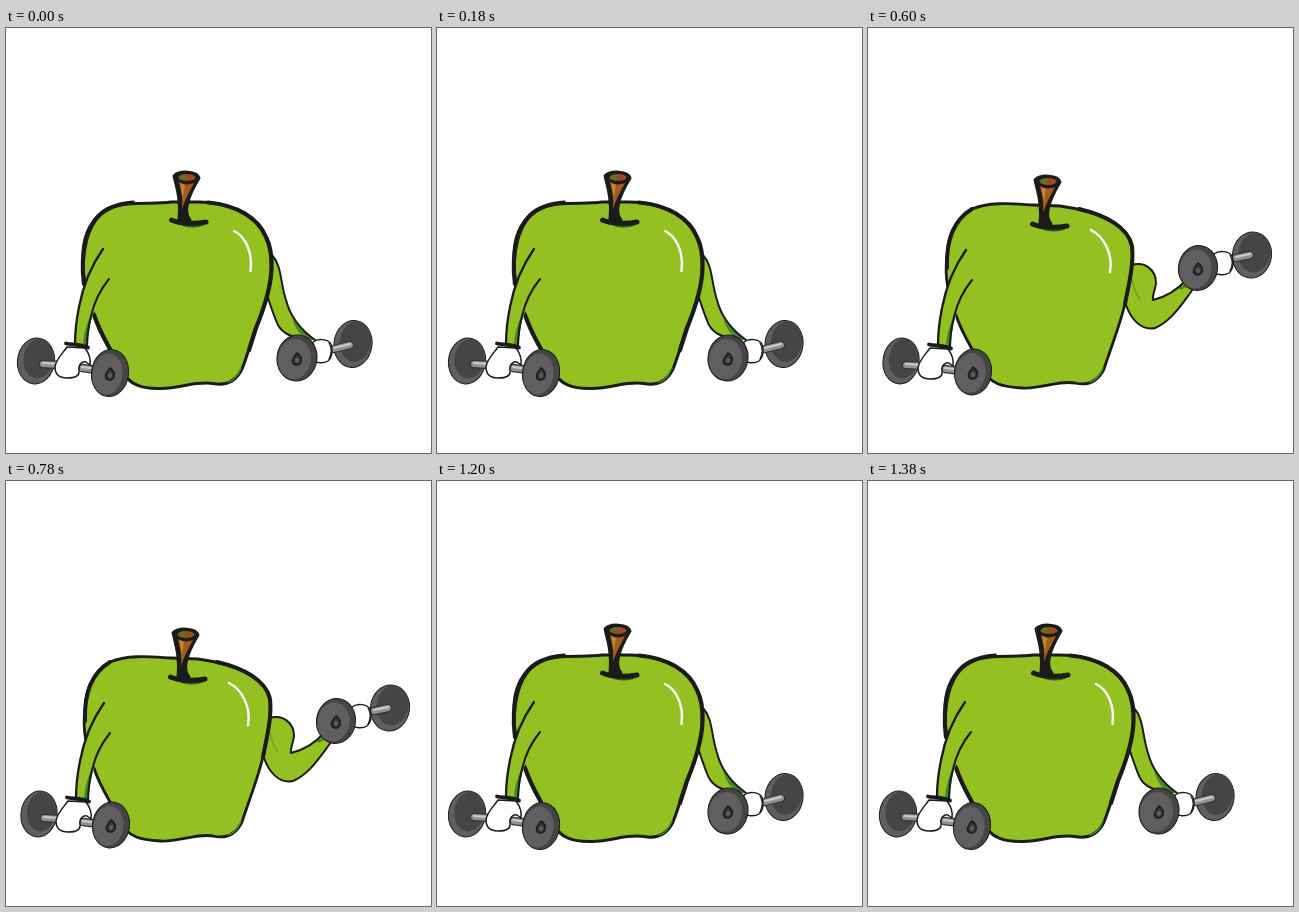
Write an HTML page that moves like this. It is 425 by 425 pixels and loops after 1500 ms.

```html
<!DOCTYPE html>
<html lang="en">
<head>
<meta charset="utf-8">
<title>Apple lifting dumbbells</title>
<style>
  html, body { margin: 0; width: 100%; height: 100%; overflow: hidden; background: #fff; }
  svg { display: block; width: 100vw; height: 100vh; }
</style>
</head>
<body>
<svg id="stage" viewBox="0 0 425 425" fill="none" stroke-linecap="round" stroke-linejoin="round"></svg>
<script>
const INK = '#1c1b1b', GREEN = '#94c122', SHADE = '#3f8a2c';
const DARK = '#464546', LIGHT = '#605e60';
const HOLD = 300;
const ORDER = [0, 1, 2, 1, 0];

const path = (d, stroke, width, fill = 'none') =>
  `<path d="${d}" stroke="${stroke}" stroke-width="${width}" fill="${fill}"/>`;
const line = (d, width = 2, color = INK) => path(d, color, width);
const shape = (d, fill) => path(d, 'none', 0, fill);
const oval = (x, y, rx, ry, fill, tilt = 0, extra = '') =>
  `<ellipse cx="${x}" cy="${y}" rx="${rx}" ry="${ry}" fill="${fill}" transform="rotate(${tilt} ${x} ${y})" ${extra}/>`;
const shift = (x, y, body) => `<g transform="translate(${x} ${y})">${body}</g>`;

const plate = ([x, y, rx, ry], rim, face, dx, dy) =>
  oval(x, y, rx, ry, rim, 8, `stroke="${INK}" stroke-width="1"`) +
  oval(x + dx, y + dy, rx - 3.5, ry - 3, face, 8);

const backPlate = spot => plate(spot, LIGHT, DARK, 2.5, -2.5);

const frontPlate = spot => plate(spot, DARK, LIGHT, -2.5, 1) +
  shift(spot[0], spot[1] + 1,
    path('M0 -6C3 -4 5 -1 4 3C2 7 -3 7 -4.5 3C-5 0 -2 -3 0 -6Z', INK, 1.6, '#3a393a') +
    oval(0, 1.5, 1.8, 2.4, LIGHT));

function bar(x1, y1, x2, y2) {
  const d = `M${x1} ${y1}L${x2} ${y2}`;
  return line(d, 8.5, '#353435') + line(d, 6, '#929092') +
    line(`M${x1} ${y1 - 1}L${x2} ${y2 - 1}`, 2, '#cccbcc');
}

function stem() {
  return shape('M172 196C181 201 193 200 199 197Z', '#315b24') +
    path('M165.5 192C174 196 190 196 200 194', INK, 5) +
    path('M168 148C171 160 175 173 173 192L184 192C177 184 181 170 193 150C191 143 173 142 168 148Z', INK, 3, INK) +
    shape('M173 154C177 157 183 157 188 155C184 163 179 171 176 181C177 171 175 162 173 154Z', '#a65a20') +
    shape('M174 155L179 157L177 170Z', '#b98a2c') +
    oval(181, 149.5, 8.5, 3.6, '#9b4a1b') +
    shape('M173 149C175 146 179 146 181 147L178 152Z', '#4d7a2c');
}

function leftHand({ left, leftPlates: [back, front] }) {
  return backPlate(back) +
    shift(...left,
      bar(37, 336, 54, 337) + bar(76, 340, 92, 342) +
      path('M61 319C57 325 50 331 49 339C49 347 53 350 61 350C69 350 74 348 73 342C72 337 76 333 80 334L84 337C85 330 82 324 79 320Z', INK, 1.5, '#fff') +
      line('M60 315.5C66 317 74 316 82 319.5', 3.8)) +
    frontPlate(front);
}

function leftArm({ left }) {
  return shift(...left,
    shape('M97 221C83 241 74 268 70 293L68 316L81 318C81 300 88 279 103 251L112 230Z', GREEN) +
    shape('M87 284C81 293 78 304 77 316L82 318C82 307 84 296 87 284Z', SHADE) +
    line('M97 221C85 238 77 258 73 279C70 294 69 305 69 316', 2.3) +
    line('M103 251C94 262 88 275 85 288C82 300 81 309 81 318', 2));
}

function rightHand({ glove, rightPlates: [front, back], bar: rod }) {
  return backPlate(back) + bar(...rod) +
    shift(...glove,
      path('M-9 -9C-4 -13 6 -12 9 -7C11 0 10 7 6 10C1 13 -6 12 -10 9Z', INK, 1.4, '#fff') +
      line('M7 -8C10 -3 10 2 7 8', 1.2)) +
    frontPlate(front);
}

const BODY = 'M165 174C147 177 121 172 102 181C86 190 78 206 77 224C75 248 81 267 88 287C95 307 105 322 114 340C123 358 137 361 155 360.5C176 360 189 353 207 355.5C220 358 230 353 236 341C241 329 245 313 250 300C257 283 265 262 265.5 240C266 227 264 217 260 209C250 187 224 174 192 174Z';
const BODY_UP = 'M165 177C147 176 123 173 104 181C87 191 79 209 79 229C76 250 81 268 88 287C94 307 106 322 114 340C122 357 136 359 154 360C176 361 190 352 207 355C220 358 230 353 236 341C241 325 251 300 257 276C261 255 266 236 264 218C258 193 227 183 192 178Z';

// The ink is heavier along the shoulders and the right flank.
const HEAVY = 'M202 174.5C231 177 252 190 260 209C264 217 266 227 265.5 240C265 262 257 283 250 300L243 322M78 256C74 226 80 192 102 181C110 177 118 175 127 174.5M88 287C94 304 99 312 104 321';
const HEAVY_UP = 'M211 181C237 187 260 199 264 218C266 236 261 255 257 276M79 240C78 209 87 191 104 181';

const POSES = [
  {
    body: BODY, heavy: HEAVY, weight: 3, stem: [0, 0], left: [0, 0],
    leftPlates: [[30, 333, 18.5, 23], [104, 345, 18.5, 23.5]],
    shine: 'M228 203C239 208 247 224 244.5 243',
    arm: 'M264 226C275 237 274 252 279 270C283 287 294 301 309 312L300 313C288 311 276 306 271 295L261 268Z',
    armInk: 'M266 227C276 238 274 254 280 272C284 288 295 302 309 312M262 270C266 282 269 291 272 297C277 306 286 309 300 312',
    armExtra: shape('M286 290C292 299 300 306 309 312L301 312C294 307 289 300 286 290Z', SHADE),
    glove: [316, 323], bar: [328, 321, 344, 317],
    rightPlates: [[291, 330, 20, 23], [347, 316, 19, 23.5]]
  },
  {
    body: BODY, heavy: HEAVY, weight: 2.8, stem: [-1, 0], left: [-1, 0],
    leftPlates: [[30, 333, 18.5, 23], [103, 344.5, 18.5, 23.5]],
    shine: 'M227 203C238 208 246 224 243.5 243',
    arm: 'M262 244C276 253 290 253 293 265C295 278 293 288 308 290L308 303C298 306 288 309 284 307C278 299 272 285 261 271Z',
    armInk: 'M263 245C275 252 289 254 293 265C295 278 293 287 306 290M262 272C271 284 275 296 281 304C285 310 296 306 306 303',
    armExtra: line('M277 261C280 263 281 267 281 270', 1, '#78a526'),
    glove: [350, 281], bar: [364, 277, 380, 273],
    rightPlates: [[325, 288, 19, 23.5], [381, 274, 19, 23.5]]
  },
  {
    body: BODY_UP, heavy: HEAVY_UP, weight: 2.8, stem: [-1, 4], left: [1, 1],
    leftPlates: [[33, 333, 18, 23], [105, 344, 18.5, 23]],
    shine: 'M223 202C237 209 245 227 242 244',
    arm: 'M262 236C278 232 289 242 288 256L285 272C300 268 311 260 319 251L326 260C315 274 303 293 287 300C273 303 263 291 257 276Z',
    armInk: 'M264 237C277 233 288 242 288 255C287 263 284 268 285 272C301 268 311 260 318 252M326 260C315 274 304 293 287 300C273 303 263 291 258 277',
    armExtra: line('M264 252C266 260 268 266 272 271', 2, '#7ba522') +
      line('M313 260L321 256', 3, SHADE),
    glove: [355, 235], bar: [368, 230, 382, 227],
    rightPlates: [[330, 240, 19.5, 22.5], [384, 227, 19.5, 23]]
  }
];

function draw(pose) {
  return shape(pose.arm, GREEN) + pose.armExtra + line(pose.armInk, 2) +
    path(pose.body, INK, pose.weight, GREEN) +
    line(pose.heavy, pose.weight + 1.2) +
    line('M222 354C229 352 232 347 235 340', 1.5, SHADE) +
    line(pose.shine, 2.4, '#fff') +
    shift(...pose.stem, stem()) +
    leftArm(pose) + leftHand(pose) + rightHand(pose);
}

const stage = document.getElementById('stage');
stage.innerHTML = POSES.map(pose => `<g>${draw(pose)}</g>`).join('');
const groups = [...stage.children];

function render(time) {
  const current = ORDER[Math.floor(time / HOLD) % ORDER.length];
  groups.forEach((group, i) => group.setAttribute('visibility', i === current ? 'visible' : 'hidden'));
}

const start = performance.now();
function tick() {
  render(performance.now() - start);
  requestAnimationFrame(tick);
}
tick();
</script>
</body>
</html>
```
